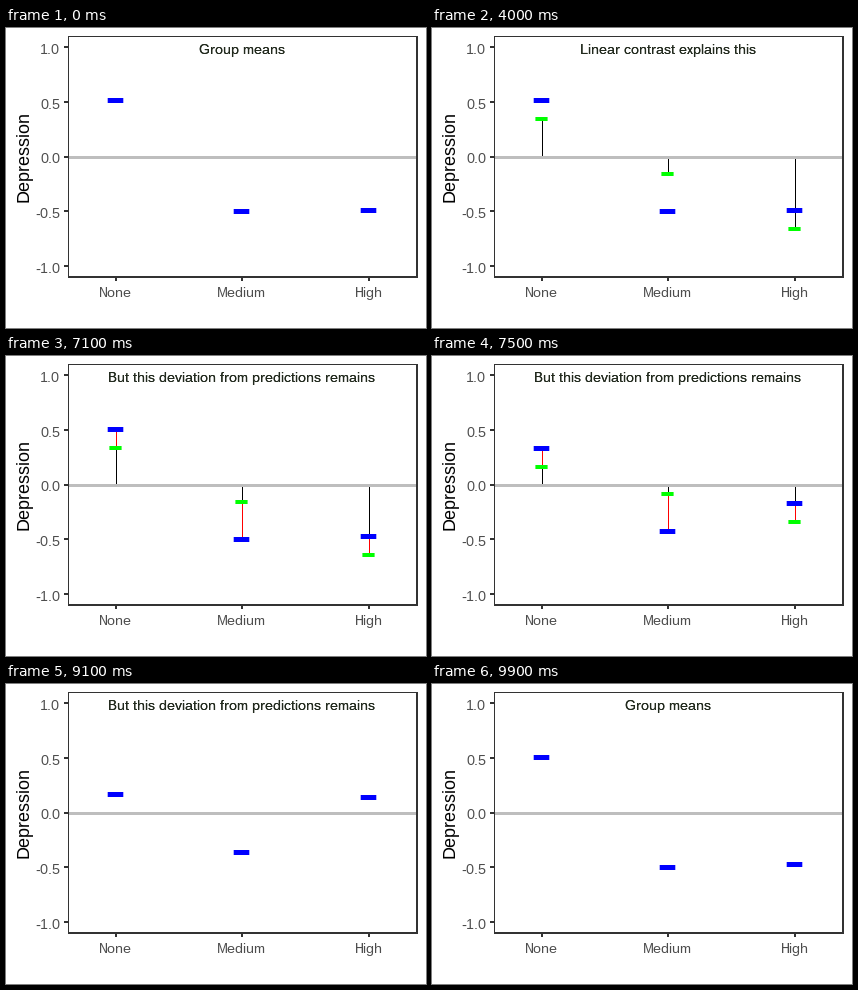
A matplotlib script that plays this animation: 420x300 px, repeating every 10 s.

```python
import math

import matplotlib.pyplot as plt
from matplotlib.animation import FuncAnimation
from matplotlib.patches import Rectangle

W, H, DPI = 420, 300, 100
FRAMES, STEP = 100, 100

# Whole-pixel letter spacing
plt.rcParams.update({
    "font.family": "Liberation Sans",
    "text.hinting": "native",
    "text.hinting_factor": 1,
})

XS = (109.5, 235.5, 362.5)
ZERO = 130.3                      # bar centre at value 0, in pixels
MEANS = (72.5, 183.5, 182.5)      # bar centres of the group means
GRAND = sum(MEANS) / 3
SLOPE = (MEANS[2] - MEANS[0]) / 2
PREDS = tuple(GRAND + k * SLOPE for k in (-1, 0, 1))
RESIDS = tuple(ZERO + m - p for m, p in zip(MEANS, PREDS))

TITLES = (
    (0, "Group means"),
    (1500, "Predictions of linear contrast"),
    (3500, "Linear contrast explains this"),
    (5500, "But this deviation from predictions remains"),
    (9500, "Group means"),
)

fig = plt.figure(figsize=(W / DPI, H / DPI), dpi=DPI, facecolor="white")
ax = fig.add_axes([0, 0, 1, 1])
ax.set_xlim(0, W)
ax.set_ylim(H, 0)
ax.axis("off")


def near(v):
    return math.floor(v + 0.5)


def rect(x0, y0, x1, y1, color, z=1):
    patch = Rectangle((x0, y0), x1 - x0, y1 - y0, facecolor=color,
                      edgecolor="none", linewidth=0, snap=False, zorder=z)
    return ax.add_patch(patch)


def label(x, y, text, px, color, ha="center", **kw):
    return ax.text(x, y, text, fontsize=px * 72 / DPI, color=color,
                   ha=ha, va="baseline", zorder=6, **kw)


def draw_axes():
    dark, grey = "#333333", "#4D4D4D"
    rect(63, 128, 411, 131, "#BEBEBE", 3)
    for box in ((62, 8, 412, 9), (62, 248, 412, 250),
                (62, 8, 63, 250), (410, 8, 412, 250)):
        rect(*box, dark, 5)
    for i in range(5):
        y = 19.2 + 54.75 * i
        rect(58, near(y) - 1, 62, near(y) + 1, dark, 5)
        label(54, near(y + 6.7), f"{1 - i / 2:.1f}", 14, grey, "right")
    for x, name in zip(XS, ("None", "Medium", "High")):
        rect(near(x) - 1, 250, near(x) + 1, 253, dark, 5)
        label(x, 269, name, 14, grey)
    label(23, 129, "Depression", 18, "black",
          rotation=90, rotation_mode="anchor")


def make_bars(color, width, height, z):
    return [rect(x - width / 2, 0, x + width / 2, height, color, z) for x in XS]


def make_stems(color, z):
    return [rect(near(x), 0, near(x) + 1, 1, color, z) for x in XS]


def place_bars(bars, centres):
    for bar, y in zip(bars, centres):
        bar.set_y(near(y - bar.get_height() / 2))


def place_stems(stems, starts, ends):
    for stem, a, b in zip(stems, starts, ends):
        top, bottom = sorted((near(a), near(b)))
        stem.set_y(top)
        stem.set_height(bottom - top)


def show(group, visible):
    for item in group:
        item.set_visible(visible)


def ease(p):
    p = min(max(p, 0), 1)
    return (1 - math.cos(math.pi * p)) / 2


def mix(a, b, p):
    return [u + (v - u) * p for u, v in zip(a, b)]


draw_axes()
black = make_stems("black", 1)
red = make_stems("red", 2)
blue = make_bars("#0000FF", 15.6, 5, 7)
green = make_bars("#00FF00", 12.2, 4, 8)
# Overprinted once for the heavier look
titles = [label(236, 26, "", 14, "#222A1E") for _ in range(2)]


def draw(i):
    t = i * STEP
    for title in titles:
        title.set_text([s for start, s in TITLES if t >= start][-1])

    p = ease((t - 7000) / 1000) - ease((t - 9000) / 1000)
    means = mix(MEANS, RESIDS, p)
    preds = mix(PREDS, [ZERO] * 3, p)
    place_bars(blue, means)
    place_bars(green, preds)
    place_stems(black, [ZERO] * 3, preds)
    place_stems(red, preds, means)

    show(green, 2000 <= t < 9100)
    show(black, 4000 <= t < 9100)
    show(red, 6000 <= t < 9100)
    return titles + blue + green + black + red


anim = FuncAnimation(fig, draw, frames=FRAMES, interval=STEP,
                     repeat=True, repeat_delay=0, blit=False)
plt.show()
```
